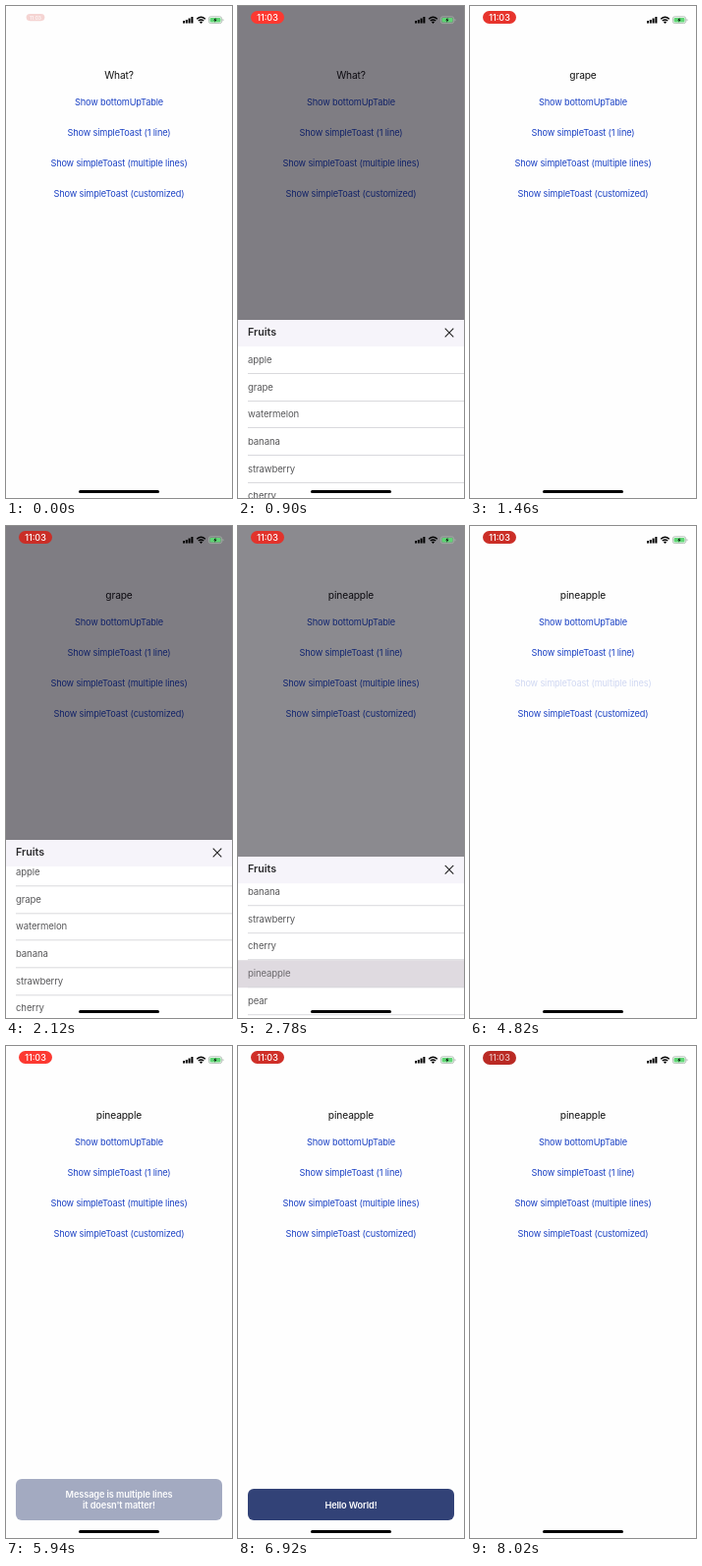
An HTML page for the animation above (8040 ms loop, 230 by 500 pixels).

```html
<!DOCTYPE html>
<html lang="en">
<head>
<meta charset="utf-8">
<title>Table and toast demo</title>
<style>
html, body { margin: 0; width: 100%; height: 100%; overflow: hidden; background: #fff; }
#stage { position: absolute; left: 0; top: 0; width: 230px; height: 500px; overflow: hidden;
  background: #fefefe; font-family: Inter, Roboto, sans-serif; white-space: nowrap; }
#stage div, #stage svg { position: absolute; }
.center { left: 0; width: 230px; text-align: center; line-height: 14px; }
#label { top: 63px; font-size: 10.2px; letter-spacing: -.12px; color: #111; }
.button { font-size: 9.2px; letter-spacing: -.16px; color: #1c42c4; }
#dim { inset: 0; background: #06030f; }
#sheet { left: 0; top: 318.7px; width: 230px; height: 184px; background: #fff; overflow: hidden; }
#head { left: 0; top: 0; width: 230px; height: 27.3px; background: #f6f4fa; }
#title { left: 10px; top: 6.6px; font-size: 10.7px; line-height: 14px; font-weight: 600; color: #2a2a2c; }
#close { left: 210px; top: 8.5px; }
#list { left: 0; top: 27.3px; width: 230px; }
.row { left: 0; width: 230px; height: 27.7px; }
.row div { left: 10px; right: 0; top: 0; height: 27px; line-height: 28px; font-size: 9.6px;
  letter-spacing: -.13px; color: #59595b; border-bottom: .7px solid #d9d9dd; }
.toast { left: 10px; width: 210px; bottom: 18px; border-radius: 6px; background: #324277; color: #fff;
  font-size: 9.2px; font-weight: 600; letter-spacing: -.1px; line-height: 11px; text-align: center;
  display: flex; align-items: center; justify-content: center; white-space: pre; }
#pill { left: 13px; top: 5.4px; width: 34px; height: 13.4px; border-radius: 7px; }
#clock { left: 0; width: 34px; line-height: 13.4px; text-align: center; color: #fff; font-size: 9px; font-weight: 500; }
#status { left: 178px; top: 8px; }
#home { left: 74px; top: 491.5px; width: 82px; height: 3.3px; border-radius: 1.7px; background: #000; }
</style>
</head>
<body>
<div id="stage">
  <div id="label" class="center"></div>
  <div id="dim"></div>
  <div id="sheet">
    <div id="list"></div>
    <div id="head">
      <div id="title">Fruits</div>
      <svg id="close" width="10" height="10"><path d="M.7.7l8.6 8.6M9.3.7L.7 9.3" stroke="#222" stroke-width="1.1"/></svg>
    </div>
  </div>
  <div id="pill"><div id="clock">11:03</div></div>
  <svg id="status" width="46" height="13">
    <path d="M2 7h2v2.5H2zM4.8 6h2v3.5h-2zM7.6 4.5h2v5h-2zM10.4 3h2v6.5h-2z" fill="#000"/>
    <g fill="none" stroke="#000" stroke-width="1.4">
      <path d="M16.2 5.3q4.3-4 8.6 0M17.8 7.1q2.7-2.4 5.4 0"/>
    </g>
    <path d="M20.5 9.9l-1.5-1.7q1.5-1.2 3 0z" fill="#000"/>
    <rect x="28.4" y="2.8" width="13.2" height="6.8" rx="2" fill="none" stroke="#a3b3a6" stroke-width=".8"/>
    <rect x="29.5" y="3.9" width="11" height="4.6" rx="1" fill="#5fd674"/>
    <path d="M42.5 5v2.4q1-.4 1-1.2t-1-1.2z" fill="#a3b3a6"/>
    <path d="M35.6 3.7l-2.4 2.9h1.6l-.6 2.2 2.4-3h-1.6z" fill="#000"/>
  </svg>
  <div id="home"></div>
</div>
<script>
const LOOP = 8040, SHEET = 182, ROW = 27.7;
const $ = id => document.getElementById(id);

function add(parent, cls, text = '') {
  const el = document.createElement('div');
  el.className = cls;
  el.textContent = text;
  parent.appendChild(el);
  return el;
}

// Smooth value between [time, value] points
function track(t, points) {
  let [t0, v0] = points[0];
  for (const [t1, v1] of points) {
    if (t < t1) {
      const p = Math.max(0, (t - t0) / (t1 - t0));
      return v0 + (v1 - v0) * p * p * (3 - 2 * p);
    }
    t0 = t1;
    v0 = v1;
  }
  return v0;
}

const buttons = [
  ['Show bottomUpTable', 91, [380, 1620]],
  ['Show simpleToast (1 line)', 122, [3360]],
  ['Show simpleToast (multiple lines)', 153, [4850]],
  ['Show simpleToast (customized)', 183.5, [6420]]
].map(([text, top, taps]) => {
  const el = add($('stage'), 'center button', text);
  el.style.top = top + 'px';
  $('stage').insertBefore(el, $('dim'));
  const fade = taps.flatMap(tap => [[tap - 110, 1], [tap - 90, .2], [tap, .2], [tap + 340, 1]]);
  return { el, fade };
});

const rows = ['apple', 'grape', 'watermelon', 'banana', 'strawberry', 'cherry', 'pineapple', 'pear', 'peach']
  .map((name, i) => {
    const el = add($('list'), 'row');
    el.style.top = i * ROW + 'px';
    add(el, '', name);
    return el;
  });

const toasts = [
  ['Hello World!', 32, 3360],
  ["Message is multiple lines\nit doesn't matter!", 42, 4850],
  ['Hello World!', 32, 6420]
].map(([text, height, start]) => {
  const el = add($('stage'), 'toast', text);
  el.style.height = height + 'px';
  $('stage').insertBefore(el, $('pill'));
  return { el, fade: [[start, 0], [start + 160, 1], [start + 940, 1], [start + 1220, 0]] };
});

const sheetUp = [[400, 0], [700, 1], [1080, 1], [1380, 0], [1640, 0], [1940, 1], [2724, 1], [3024, 0]];
const scroll = [[2050, 0], [2440, 88]];
const growth = [[0, 0], [260, 1]];
const hold = [[7840, 0], [7980, 1]];

function draw(t) {
  $('label').textContent = t < 1060 ? 'What?' : t < 2700 ? 'grape' : 'pineapple';
  for (const { el, fade } of [...buttons, ...toasts]) el.style.opacity = track(t, fade);

  const up = track(t, sheetUp);
  $('dim').style.opacity = .51 * up;
  $('sheet').style.transform = `translateY(${(1 - up) * SHEET}px)`;
  $('sheet').style.visibility = up ? 'visible' : 'hidden';
  $('list').style.transform = `translateY(${-track(t, scroll)}px)`;
  const chosen = t > 1000 && t < 1400 ? 1 : t > 2620 && t < 3040 ? 6 : -1;
  rows.forEach((row, i) => {
    row.style.background = i === chosen ? '#dfdae0' : '';
    row.firstChild.style.color = i === chosen ? '#6c696d' : '';
  });

  // The recording pill pulses, then darkens while held
  const grow = track(t, growth), held = track(t, hold);
  const pulse = .9 + .1 * Math.cos((t - 900) / 2520 * 2 * Math.PI);
  const glow = pulse + (.74 - pulse) * held;
  const pill = $('pill').style;
  pill.background = `rgb(${252 * glow}, ${57 * glow}, ${49 * glow})`;
  pill.opacity = .2 + .8 * grow;
  pill.transform = `scale(${.55 + .45 * grow})`;
  $('clock').style.opacity = 1 - .3 * held;
}

const start = performance.now();
function frame() {
  draw((performance.now() - start) % LOOP);
  requestAnimationFrame(frame);
}
frame();
</script>
</body>
</html>
```
